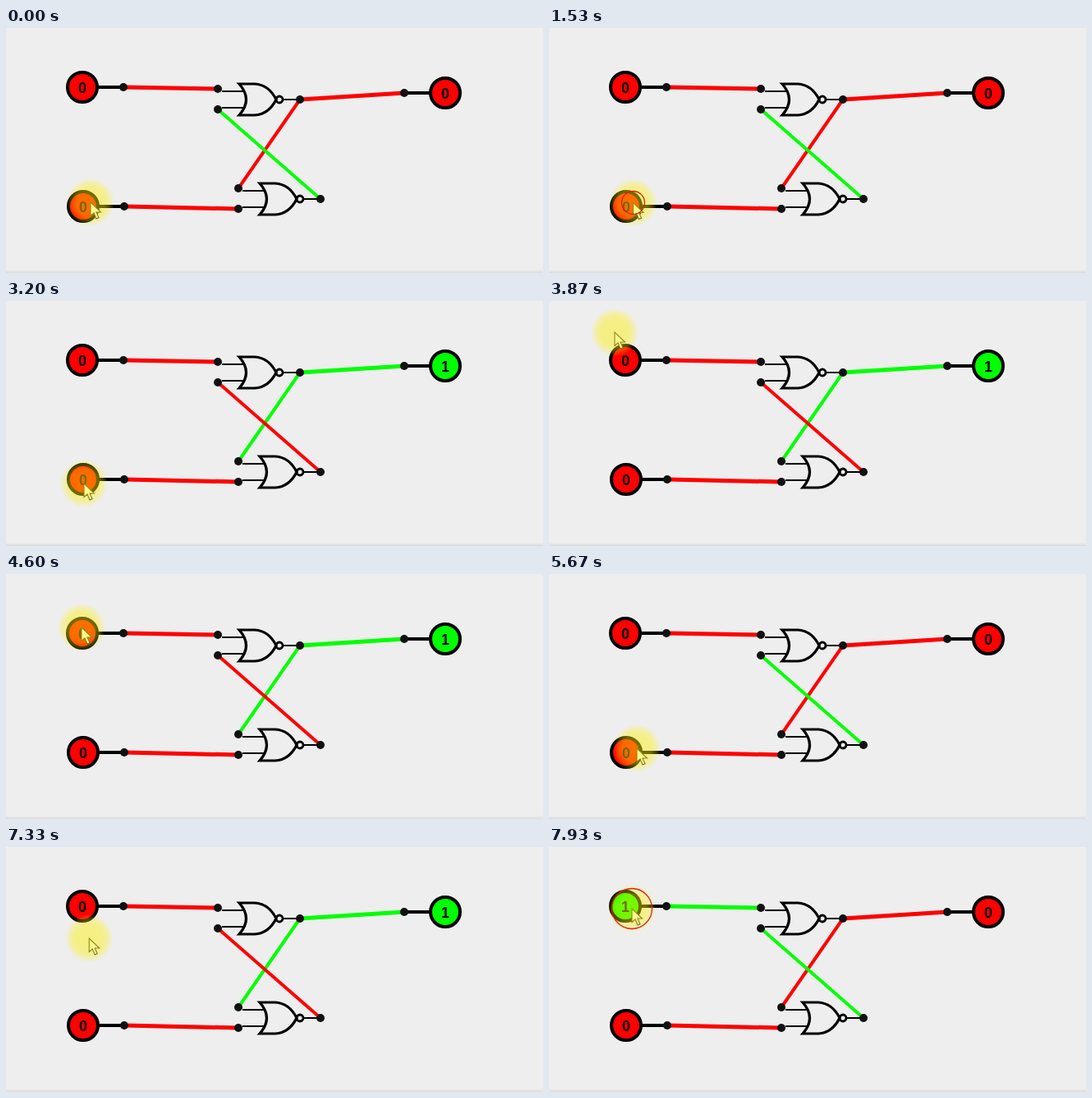
Recreate the animation shown at these times as an HTML page. Size 654 px wide and 298 px high, loop 8 s.

```html
<!DOCTYPE html>
<html lang="en">
<head>
<meta charset="utf-8">
<title>SR latch</title>
<style>
html, body { margin: 0; width: 100%; height: 100%; overflow: hidden; background: #eee; }
svg { display: block; width: 654px; height: 298px; }
text { font: bold 18px "Liberation Sans", Arial, sans-serif; text-anchor: middle; }
</style>
</head>
<body>
<svg id="stage" viewBox="0 0 654 298">
  <defs>
    <radialGradient id="glow">
      <stop offset="0" stop-color="#fff000" stop-opacity=".47"/>
      <stop offset=".6" stop-color="#fff000" stop-opacity=".43"/>
      <stop offset=".8" stop-color="#fff000" stop-opacity=".26"/>
      <stop offset="1" stop-color="#fff000" stop-opacity="0"/>
    </radialGradient>
    <linearGradient id="edge" x2="0" y2="1">
      <stop offset="0" stop-color="#eee"/>
      <stop offset="1" stop-color="#dadada"/>
    </linearGradient>
    <g id="gate" fill="none" stroke="#000">
      <path d="M-21 -10H6M-21 10H6M54 0H74" stroke-width="2"/>
      <path d="M0 -19H19Q36 -18 45 0Q36 18 19 19H0Q17 0 0 -19Z" stroke-width="3.2"/>
      <circle cx="49" r="4" stroke-width="2.8"/>
    </g>
  </defs>
  <rect y="294" width="654" height="4" fill="url(#edge)"/>
  <g id="circuit"></g>
  <path id="arrow" d="M0 0V16.5L4 13L7 20L10 18.7L7 12H12.5Z" fill="#fff" stroke="#333" stroke-width="1.1"/>
  <circle id="halo" r="29.5" fill="url(#glow)"/>
  <circle id="ring" fill="none" stroke="#e02010" stroke-width="1.3"/>
</svg>
<script>
const LOOP = 8000, STEP = 1000 / 15;
const circuit = document.getElementById('circuit');
const arrow = document.getElementById('arrow');
const halo = document.getElementById('halo');
const ring = document.getElementById('ring');

function add(tag, attrs) {
  const el = document.createElementNS('http://www.w3.org/2000/svg', tag);
  for (const k in attrs) el.setAttribute(k, attrs[k]);
  return circuit.appendChild(el);
}

function wire(x1, y1, x2, y2, width, stroke = '#000') {
  return add('line', { x1, y1, x2, y2, stroke, 'stroke-width': width });
}

function lamp(x, y) {
  const disc = add('circle', { cx: x, cy: y, r: 18, stroke: '#000', 'stroke-width': 4 });
  const label = add('text', { x, y: y + 6.5 });
  return on => {
    disc.setAttribute('fill', color(on));
    label.textContent = on ? '1' : '0';
  };
}

const color = on => on ? '#0f0' : '#f00';

wire(112, 72, 143, 72, 4);
wire(113, 217, 144, 217, 4);
wire(485, 79, 516, 79, 4);
add('use', { href: '#gate', x: 284, y: 87 });
add('use', { href: '#gate', x: 309, y: 208 });

const wires = {
  r: [wire(143, 72, 258, 74, 5)],
  s: [wire(144, 217, 283, 220, 5)],
  q: [wire(358, 87, 485, 79, 5), wire(358, 87, 283, 195, 4)],
  nq: [wire(383, 208, 258, 99, 4)]
};
const lamps = { r: lamp(93, 72), s: lamp(94, 217), q: lamp(535, 79) };

const dots = [[143, 72], [258, 74], [258, 99], [358, 87], [485, 79],
  [144, 217], [283, 195], [283, 220], [383, 208]];
for (const [cx, cy] of dots) add('circle', { cx, cy, r: 5, fill: '#111' });

// Mouse presses: step, input. The input flips one step later.
const presses = [[23, 's'], [29, 's'], [71, 'r'], [74, 'r'], [93, 's'], [95, 's'], [118, 'r']];

// Pointer path: step, x, y
const path = [
  [0, 103, 212], [2, 103, 212], [7, 101, 215], [13, 102, 213], [18, 102, 213],
  [22, 102.5, 212.5], [37, 102.5, 212.5], [42, 79, 252], [48, 95, 222], [50, 95, 222],
  [58, 80, 38], [64, 76, 63], [69, 92, 65], [80, 92, 65], [85, 107, 212],
  [92, 102, 212], [101, 102, 212], [102, 102, 211], [104, 102, 211],
  [113, 101, 76], [117, 101, 75], [120, 101, 75]
];

function pointer(n) {
  let i = 1;
  while (i < path.length - 1 && path[i][0] < n) i++;
  const [a, ax, ay] = path[i - 1], [b, bx, by] = path[i];
  const u = Math.min(1, (n - a) / (b - a)), e = u * u * (3 - 2 * u);
  return [ax + (bx - ax) * e, ay + (by - ay) * e];
}

function latch(n) {
  const state = { r: false, s: false, q: false };
  for (const [at, input] of presses) {
    if (n <= at) break;
    state[input] = !state[input];
    if (state.r) state.q = false;
    if (state.s) state.q = true;
  }
  state.nq = !state.q;
  return state;
}

function draw(ms) {
  const n = Math.floor((ms % LOOP + 5) / STEP);
  const state = latch(n);
  for (const k in wires) for (const w of wires[k]) w.setAttribute('stroke', color(state[k]));
  for (const k in lamps) lamps[k](state[k]);

  const [x, y] = pointer(n), place = `translate(${x} ${y})`;
  for (const el of [arrow, halo, ring]) el.setAttribute('transform', place);

  const last = presses.filter(p => p[0] <= n).pop();
  const age = last ? n - last[0] : 9;
  ring.setAttribute('r', age ? 24.5 : 14);
  ring.setAttribute('opacity', age < 3 ? 1 : age < 4 ? 0.3 : 0);
}

const start = performance.now();
function tick() {
  draw(performance.now() - start);
  requestAnimationFrame(tick);
}
tick();
</script>
</body>
</html>
```
